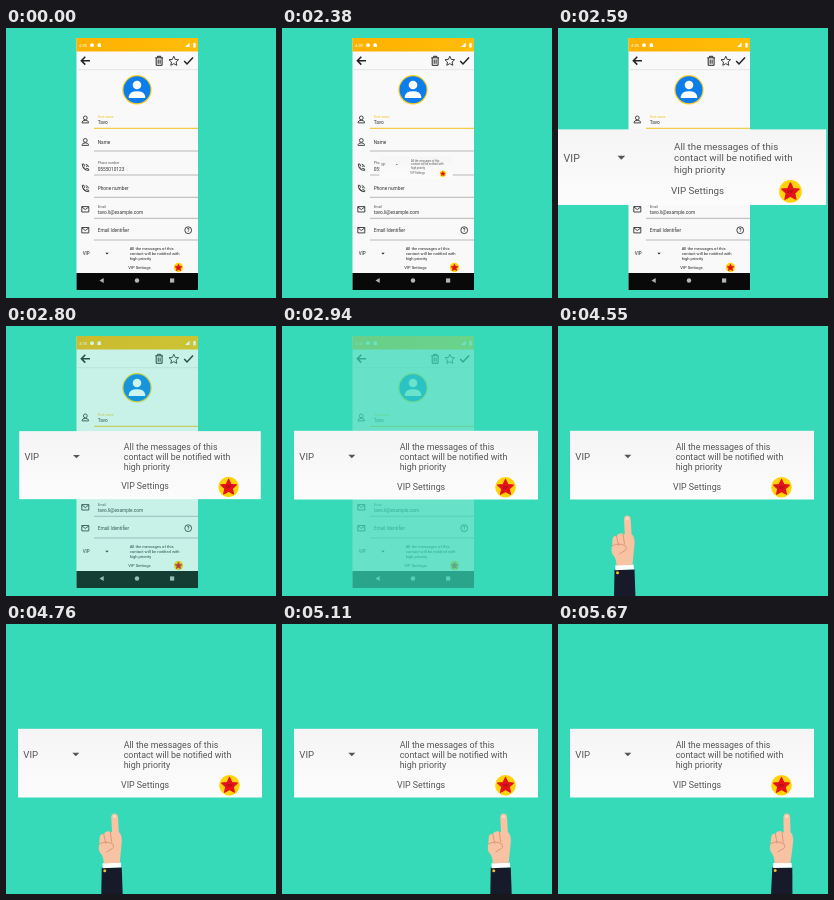
An HTML page for the animation above (6300 ms loop, 270x270 px).

```html
<!DOCTYPE html>
<html lang="en">
<head>
<meta charset="utf-8">
<title>VIP contact</title>
<style>
html, body { margin: 0; width: 100%; height: 100%; overflow: hidden; background: #36dab8; }
svg { display: block; width: 100%; height: 100%; font-family: Roboto, sans-serif; }
.line { fill: none; stroke: #333; stroke-width: .9; }
.small { font-size: 3.35px; fill: #555; }
.value { font-size: 4.75px; fill: #333; }
</style>
</head>
<body>
<svg viewBox="0 0 270 270">
  <defs>
    <linearGradient id="bar"><stop stop-color="#ffb000"/><stop offset="1" stop-color="#ffbd0a"/></linearGradient>
    <linearGradient id="paper" x2="0" y2="1"><stop stop-color="#f5f5f5"/><stop offset="1" stop-color="#fcfcfc"/></linearGradient>
    <path id="star" d="M0-6.6 2-2.2 6.7-1.8 3.2 1.4 4.2 6 0 3.7-4.2 6-3.2 1.4-6.7-1.8-2-2.2Z"/>
    <g id="badge">
      <circle r="10.3" fill="#ffd20a"/>
      <use href="#star" transform="scale(1.18)" fill="#e3121b" stroke="#e3121b" stroke-width="1" stroke-linejoin="round"/>
      <text y="1.5" font-size="3.6" font-weight="700" text-anchor="middle" fill="#a80d18">VIP</text>
    </g>
    <g id="person" class="line">
      <circle cy="-1.6" r="1.9"/>
      <path d="M-3.2 3.4V2.6Q-3 .9 0 .9T3.2 2.6V3.4Z"/>
    </g>
    <path id="call" class="line" d="M-3-3H-1.4L-.8-.9-1.8 0Q-1 1.6.5 2.3L1.3 1.3 3.4 2V3.4Q-2.9 3.4-3-3ZM.5-2.8Q2.8-2.4 3.2 0M.6-1.2Q1.6-1 1.8 0"/>
    <path id="mail" class="line" d="M-3.5-2.7H3.5V2.7H-3.5ZM-3.5-2.4 0 .3 3.5-2.4"/>
  </defs>
  <rect width="270" height="270" fill="#36dab8"/>

  <g id="phone">
    <rect x="70.5" y="10" width="121.5" height="252" fill="#f9f9f9"/>
    <rect x="70.5" y="10" width="121.5" height="13.5" fill="url(#bar)"/>
    <g fill="#fff">
      <text x="73" y="19" font-size="4.3">4:05</text>
      <circle cx="86" cy="17.2" r="1.9"/>
      <path d="M91.5 19V16.6Q93.3 13.4 95 16.6V19Z"/>
      <path d="M179 19H183.600V14.800ZM187.300 15H189.700V19.400H187.300Z"/>
    </g>
    <g fill="none" stroke="#222" stroke-width="1.2">
      <path d="M84 32.700H75.500M79.300 28.800 75.400 32.700 79.300 36.600" stroke-width="1.6"/>
      <path d="M149.300 29.800H157M151.500 29.500V28.300H154.800V29.500M150.200 30V37.300H156.100V30M152.200 31.500V35.800M154.100 31.500V35.800" stroke-width="1"/>
      <use href="#star" transform="translate(167.800 33) scale(.72)" stroke-width="1.2"/>
      <path d="M178.200 33 181 36 187 29.500" stroke-width="1.5"/>
    </g>
    <path d="M70.500 41.700H192" stroke="#dedede" stroke-width=".7"/>

    <circle cx="131" cy="61.800" r="14.700" fill="#f8cf2c"/>
    <circle cx="131" cy="61.800" r="13.500" fill="#0c7de9"/>
    <circle cx="131" cy="57" r="4.300" fill="#fff"/>
    <path d="M122.800 70V68.500Q123.500 63.300 131 63.300T139.200 68.500V70Z" fill="#fff"/>
    <g id="fields"></g>

    <g class="line" stroke-width=".8">
      <circle cx="182.200" cy="202.200" r="3.400"/>
    </g>
    <text x="182.200" y="204" font-size="5" font-weight="700" text-anchor="middle" fill="#333">?</text>
    <g fill="#222">
      <text x="76.700" y="227.300" font-size="4.500">VIP</text>
      <path d="M99.300 224.800H102.700L101 226.500Z"/>
      <g font-size="4.120">
        <text x="123.700" y="222.300">All the messages of this</text>
        <text x="123.700" y="227">contact will be notified with</text>
        <text x="123.700" y="231.700">high priority</text>
        <text x="122.300" y="241">VIP Settings</text>
      </g>
    </g>
    <use href="#badge" transform="translate(172.500 239.500) scale(.45)"/>
    <rect x="70.500" y="245" width="121.500" height="17" fill="#090909"/>
    <g fill="#b5b5b5">
      <path d="M93.500 252.500 97.700 250V255Z"/>
      <circle cx="131" cy="252.500" r="2.200"/>
      <rect x="164" y="250.400" width="4.200" height="4.200"/>
    </g>
  </g>

  <g id="card">
    <rect x="12" y="104.800" width="244" height="68.700" fill="url(#paper)"/>
    <g fill="#555">
      <text x="17.300" y="134.200" font-size="9.600">VIP</text>
      <path d="M66.300 128.800H73.300L69.800 132.300Z"/>
      <g font-size="8.870">
        <text x="117.700" y="123.700">All the messages of this</text>
        <text x="117.700" y="134">contact will be notified with</text>
        <text x="117.700" y="144.200">high priority</text>
        <text x="115" y="163.700">VIP Settings</text>
      </g>
    </g>
    <use href="#badge" x="223.500" y="161.200"/>
  </g>

  <g id="hand">
    <path d="M56.500 243.500H76.500L77.500 272H56Z" fill="#161a2b"/>
    <path d="M57.300 239.300 75.500 238.600 76 243.200 57.300 244.300Z" fill="#fff"/>
    <circle cx="59.500" cy="246.700" r="1.500" fill="#f1c232"/>
    <path d="M66 193Q66.300 189.500 69.300 189.500T72.700 193L73.600 208Q77 211 76.500 218L74.500 238.800 58.500 239.500Q58.300 232 54.700 228.500 52.700 225 54 220L54.500 213Q55 209.500 58.500 210 60.500 206.300 64.500 207.500L66.800 208.500Z" fill="#f7c3a2"/>
    <path d="M58.500 210 60.500 219.500M65 208 66.500 218M54 220Q61 216 67.500 220 70 224 64.500 226L61.500 228" fill="none" stroke="#d99578" stroke-width=".9" stroke-linecap="round"/>
    <path d="M67.800 191.800Q69.300 190 70.900 191.800V193.800H67.800Z" fill="#fbdcca"/>
  </g>
</svg>
<script>
const LOOP = 6300, STEP = 70;
const byId = id => document.getElementById(id);
const [phone, card, hand] = ['phone', 'card', 'hand'].map(byId);

// icon, centre y, label, value, underline y
const rows = [
  ['person', 91.5, 'First name', 'Tavo', 100.3],
  ['person', 114, '', 'Name', 123],
  ['call', 139, 'Phone number', '0555010123', 147],
  ['call', 160.3, '', 'Phone number', 169.3],
  ['mail', 181.3, 'Email', 'tavo.li@example.com', 190.3],
  ['mail', 202.2, '', 'Email Identifier', 212]
];
byId('fields').innerHTML = rows.map(([icon, y, label, value, line], i) => `
  <use href="#${icon}" x="79.3" y="${y}"/>
  <text class="small" x="91.7" y="${line - 10.6}" ${i ? '' : 'style="fill:#f2c11d"'}>${label}</text>
  <text class="value" x="91.7" y="${label ? line - 4.1 : y + 1.7}">${value}</text>
  <path d="M88 ${line}H192" stroke="${i ? '#9b9b9b' : '#f2c11d'}" stroke-width="${i ? .7 : 1}"/>`).join('');

const smooth = p => (1 - Math.cos(Math.PI * p)) / 2;

// Interpolates a [time, value] table, clamped at both ends.
function track(points, t, ease = p => p) {
  if (t <= points[0][0]) return points[0][1];
  for (let i = 1; i < points.length; i++) {
    const [t0, a] = points[i - 1], [t1, b] = points[i];
    if (t < t1) return a + (b - a) * ease((t - t0) / (t1 - t0));
  }
  return points[points.length - 1][1];
}

const popScale = [[2380, .3], [2590, 1.1], [2730, .98], [2870, 1]];
const phoneFade = [[2730, 1], [3010, 0]];
const handX = [[4550, 0], [5180, 157]];
const handTilt = [[5110, 0], [5670, 1.8]];

function draw(t) {
  phone.setAttribute('opacity', track(phoneFade, t));
  card.style.display = t < 2380 ? 'none' : '';
  card.setAttribute('transform',
    `translate(134 139) scale(${track(popScale, t)}) translate(-134 -139)`);
  hand.style.display = t < 4550 ? 'none' : '';
  hand.setAttribute('transform',
    `translate(${track(handX, t, smooth)}) rotate(${track(handTilt, t, smooth)} 67 270)`);
}

const start = performance.now();
function tick() {
  const t = (performance.now() - start) % LOOP;
  draw(Math.floor(t / STEP) * STEP);
  requestAnimationFrame(tick);
}
tick();
</script>
</body>
</html>
```
